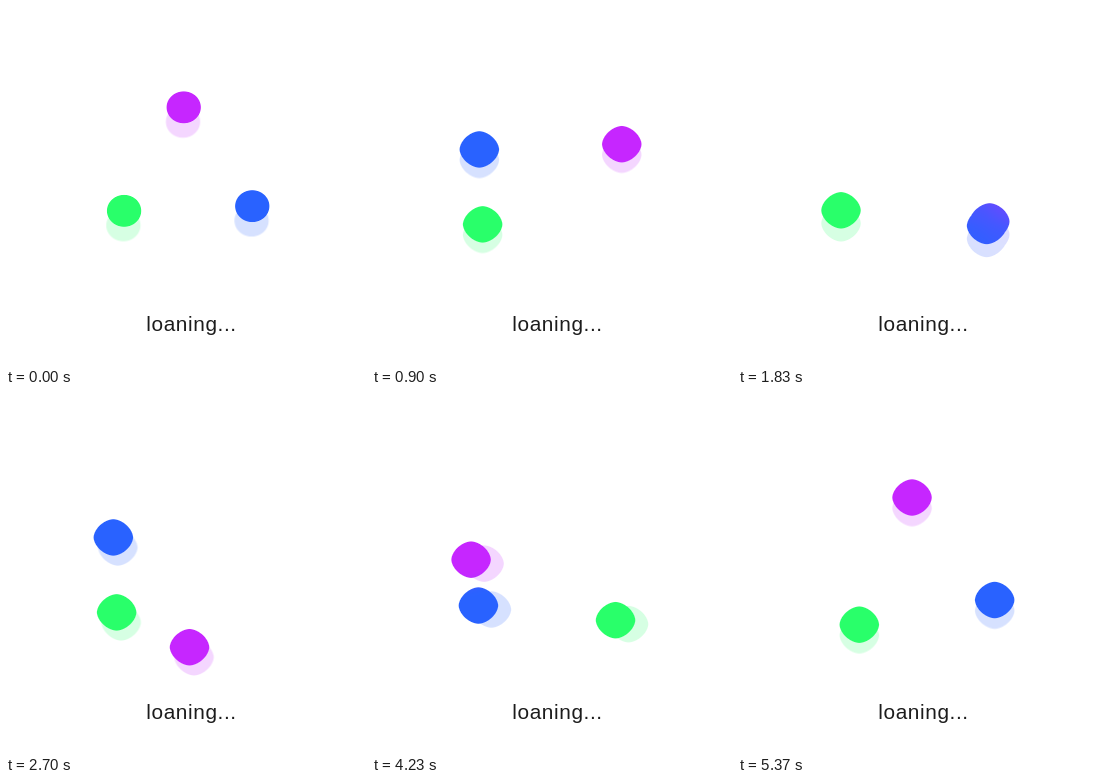
Write an HTML page with a canvas that moves like this. It is 360 by 360 pixels and loops after 5.4 s.

```html
<!DOCTYPE html>
<html lang="en">
<head>
<meta charset="utf-8">
<title>Loader</title>
<style>
  html, body { margin: 0; width: 100%; height: 100%; overflow: hidden; background: #fff; }
  svg, canvas { position: absolute; left: 0; top: 0; width: 360px; height: 360px; }
  text { font: 20.8px "Liberation Sans", Arial, Helvetica, sans-serif; letter-spacing: 0.6px; fill: #1c1c1c; }
</style>
</head>
<body>
<canvas id="stage" width="360" height="360"></canvas>
<svg viewBox="0 0 360 360"><text x="140.3" y="325.3">loaning...</text></svg>
<script>
const LOOP = 5400, STEP = 30;
const AREA = { x: 68, y: 76, w: 228, h: 208 };
const ORBIT = { x: 180.2, y: 178.3, rx: 82.3, ry: 75 };
const SHADOW_ALPHA = 0.19;

// start angle in degrees, turns per loop; later balls lie on top
const BALLS = [
  { start: -92.3, turns: 1, rgb: [198, 38, 255] },
  { start: 27.7, turns: 3, rgb: [41, 98, 255] },
  { start: 147.7, turns: 6, rgb: [41, 255, 106] }
];

// time, shadow x, shadow y
const SHADOW = [
  [0, -0.7, 14.5], [300, 0, 10], [900, 0, 10.5], [1650, 0.5, 13.3],
  [1830, 0, 13], [2110, 0.5, 10.7], [2700, 4.5, 10], [3570, 10.3, 7.5],
  [4130, 13, 4.6], [4355, 13, 3], [5030, 3, 6.5], [5260, 0.2, 9], [5400, 0, 11]
];

const ctx = document.getElementById('stage').getContext('2d');
const layer = document.createElement('canvas');
layer.width = AREA.w;
layer.height = AREA.h;
const layerCtx = layer.getContext('2d');
const image = layerCtx.createImageData(AREA.w, AREA.h);

const lerp = (a, b, k) => a + (b - a) * k;
const clamp = v => Math.min(1, Math.max(0, v));

function shadowAt(t) {
  const i = SHADOW.findIndex(s => s[0] > t);
  const a = SHADOW[i - 1], b = SHADOW[i];
  const k = (t - a[0]) / (b[0] - a[0]);
  return [lerp(a[1], b[1], k), lerp(a[2], b[2], k)];
}

function poseAt(t) {
  const p = clamp(t / 300);
  const grow = p * p * (3 - 2 * p);
  const zoom = lerp(0.9, 1, grow);
  const pose = {
    rx: lerp(17.1, 19.7, grow),
    ry: lerp(15.9, 18.2, grow),
    power: lerp(2, 1.74, grow)
  };
  pose.centres = BALLS.map(b => {
    const a = (b.start + 360 * b.turns * t / LOOP) * Math.PI / 180;
    return {
      x: lerp(185, ORBIT.x + ORBIT.rx * Math.cos(a), zoom),
      y: lerp(83, ORBIT.y + ORBIT.ry * Math.sin(a), zoom)
    };
  });
  return pose;
}

// Fills the layer with the balls, fused and colour-blended where they meet
function paintBalls({ rx, ry, power, centres }) {
  const near = centres.map(a => centres.map(b =>
    Math.exp(-2 * (((a.x - b.x) / rx) ** 2 + ((a.y - b.y) / ry) ** 2))));
  const lift = near.map((row, i) =>
    Math.exp(2 * row.slice(0, i).reduce((s, v) => s + v, 0)));
  const field = [0, 0, 0];
  const data = image.data;
  data.fill(0);

  for (let py = 0, at = 0; py < AREA.h; py++) {
    for (let px = 0; px < AREA.w; px++, at += 4) {
      let sum = 0, weight = 0, r = 0, g = 0, b = 0;
      for (let i = 0; i < 3; i++) {
        const u = Math.abs(AREA.x + px + 0.5 - centres[i].x) / rx;
        const v = Math.abs(AREA.y + py + 0.5 - centres[i].y) / ry;
        field[i] = 0;
        if (u > 2.2 || v > 2.2) continue;
        const d2 = (u ** power + v ** power) ** (2 / power);
        field[i] = Math.exp(3.8 * (1 - d2));
        sum += field[i];
        const w = lift[i] * Math.exp(-1.6 * d2), c = BALLS[i].rgb;
        weight += w;
        r += w * c[0];
        g += w * c[1];
        b += w * c[2];
      }
      if (sum < 0.7) continue;
      for (let i = 0; i < 3; i++)
        for (let j = 0; j < i; j++)
          sum -= Math.min(field[i], field[j]) * near[i][j];
      data[at] = r / weight;
      data[at + 1] = g / weight;
      data[at + 2] = b / weight;
      data[at + 3] = 255 * clamp(0.5 + (sum - 1) * 2.4);
    }
  }
  layerCtx.putImageData(image, 0, 0);
}

function draw(t) {
  paintBalls(poseAt(t));
  const [dx, dy] = shadowAt(t);
  ctx.clearRect(0, 0, 360, 360);
  ctx.globalAlpha = SHADOW_ALPHA;
  ctx.drawImage(layer, AREA.x + dx, AREA.y + dy);
  ctx.globalAlpha = 1;
  ctx.drawImage(layer, AREA.x, AREA.y);
}

const began = performance.now();
let shown = -1;
function tick() {
  const t = Math.floor((performance.now() - began) % LOOP / STEP) * STEP;
  if (t !== shown) draw(shown = t);
  requestAnimationFrame(tick);
}
tick();
</script>
</body>
</html>
```
